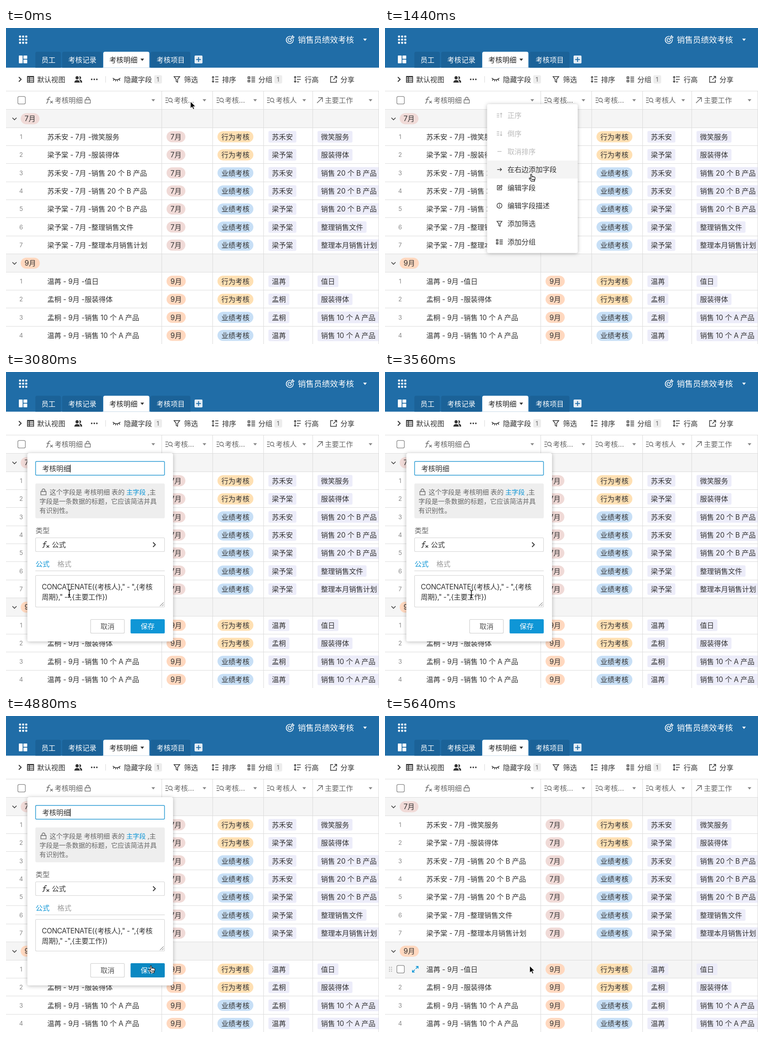
These frames come from a looping animation (813 by 689 pixels, 5.68 s). An HTML page:

```html
<!DOCTYPE html>
<html lang="zh-CN">
<head>
<meta charset="utf-8">
<style>
html, body { margin: 0; width: 100%; height: 100%; overflow: hidden; background: #fff; }
svg { display: block; }
text { font-family: Inter, "Noto Sans CJK SC", "Noto Sans CJK", sans-serif; white-space: pre; word-spacing: -.3px; }
.float { filter: drop-shadow(0 1px 4px rgba(0, 0, 0, .28)); }
</style>
</head>
<body>
<svg id="stage" width="813" height="689" viewBox="0 0 813 689"></svg>
<script>
const LOOP = 5680, MENU_AT = 760, PANEL_AT = 1870, SAVE_AT = 5160;
const PITCH = 39.37, SIZE = 15.3, HOVER_ROW = 9;
const INK = '#333', GRAY = '#666', LINE = '#dcdcdc', BLUE = '#0f96d6';

const pen = document.createElement('canvas').getContext('2d');
pen.font = `${SIZE}px Inter, "Noto Sans CJK SC", "Noto Sans CJK", sans-serif`;

// Shape helpers; text and icons are placed by their vertical centre.
const text = (x, y, s, fill = INK, size = SIZE, more = '') =>
  `<text x="${x}" y="${y + size * .37}" fill="${fill}" font-size="${size}" ${more}>${s}</text>`;
const rect = (x, y, w, h, fill, r = 0, more = '') =>
  `<rect x="${x}" y="${y}" width="${w}" height="${h}" rx="${r}" fill="${fill}" ${more}/>`;
const box = (x, y, w, h, stroke, r = 2, width = 1.1) =>
  rect(x, y, w, h, '#fff', r, `stroke="${stroke}" stroke-width="${width}"`);
const icon = (name, x, y, color = INK, width = 1.5) =>
  `<path d="${ICONS[name]}" transform="translate(${x} ${y})" fill="none" stroke="${color}" stroke-width="${width}"/>`;
const solid = (name, x, y, color = INK) =>
  `<path d="${ICONS[name]}" transform="translate(${x} ${y})" fill="${color}"/>`;
const label = (x, y, s, fill, h, r, pad) =>
  rect(x, y - h / 2, pen.measureText(s).width + 2 * pad, h, fill, r) + text(x + pad, y, s);
const pill = (x, y, s, fill) => label(x, y, s, fill, 24.2, 12.1, 8.5);
const chip = (x, y, s) => label(x, y, s, '#ececf9', 25.2, 3, 7.5);
const group = (id, body) => `<g id="${id}">${body}</g>`;
const rowY = k => 197.8 + PITCH * k;

const ICONS = {
  caret: 'M-4-2.3h8l-4 5z',
  right: 'M-2.5-5l5 5-5 5',
  down: 'M-4.5-2l4.5 4.5 4.5-4.5',
  fx: 'M2-6.3c-3.3-1.5-4.5.5-5 3.3l-1.2 6.5c-.5 2.5-1.5 3.3-3.3 2.5M-6.5-2h7M1.5 1.5l5.5 5M7 1.5l-5.5 5',
  lock: 'M-5.7-1h11.4v7.3h-11.4zM-3.2-1v-2.3a3.2 3.2 0 0 1 6.4 0V-1',
  lookup: 'M-8-5h6M-8 0h4.5M-8 5h6M-1.3-.5a4 4 0 1 0 8 0a4 4 0 1 0-8 0M5.3 2.8l2.4 3.2',
  link: 'M-6 6L5.5-5.5M-3.5-5.7h9.2v9.2',
  filter: 'M-6.2-6h12.4l-4.6 6v6.2l-3.2-1.6v-4.6z',
  sort: 'M0-5.5h7M0 0h7M0 5.5h7M-4.7-6v12M-7-4l2.3-2.3L-2.4-4M-7 4l2.3 2.3L-2.4 4',
  group: 'M-7.5-5.5h4v3.7h-4zM-7.5 1.8h4v3.7h-4zM0-5h8M0-1.5h8M0 2h8M0 5.5h8',
  height: 'M-1-5.5h8.5M-1 0h8.5M-1 5.5h5M-4.8-6v12M-7-4l2.2-2.3L-2.6-4M-7 4l2.2 2.3L-2.6 4',
  share: 'M-1-6h-5.5v12.5h12.5v-5.5M2-6.5h4.7v4.7M6.5-6.3l-7 7',
  table: 'M-6.8-6.5h13.6v13h-13.6zM-6.8-5h13.6M-6.8-1h13.6M-6.8 3h13.6M-2.5-6v12',
  eye: 'M-8-3c3.2 5 12.8 5 16 0M-5.5 0l-1.7 2.8M-1.8 1.2l-.5 3.2M1.8 1.2l.5 3.2M5.5 0l1.7 2.8',
  people: 'M-6-3.5a3.5 3.5 0 1 1 7 0a3.5 3.5 0 1 1-7 0M-8.5 7c0-7.5 12-7.5 12 0zM2.3-6.8a3.3 3.3 0 1 1 0 6.5q1.5-3.2 0-6.5M4.8 7q0-4-2.6-6c4-.8 6.3 2 6.3 6z',
  goal: 'M2.2-7.4a7.7 7.7 0 1 0 5.3 5.3M1-3.6a3.8 3.8 0 1 0 2.7 2.7M0 0l4.2-4.2v-3l2-2 .8 2.3 2.3.8-2 2h-3',
  asc: 'M-6.5-4h6M-6.5 0h6M-6.5 4h6M4-5.5v11M1.7-3.2L4-5.5l2.3 2.3',
  desc: 'M-6.5-4h6M-6.5 0h6M-6.5 4h6M4-5.5v11M1.7 3.2L4 5.5l2.3-2.3',
  minus: 'M-5 0h10',
  go: 'M-5.5 0h10M1.5-3.5L5 0l-3.5 3.5',
  edit: 'M1-5h-6.2v10.4h10.4v-6M-2 2.2l.5-2.6 6-5.6 2 2-6 5.7z',
  info: 'M-6 0a6 6 0 1 0 12 0a6 6 0 1 0-12 0M0-.8v4M0-3.4v1.5',
  expand: 'M1-1l5-5M1.5-6h4.7v4.7M-1 1l-5 5M-6.2 1.5v4.7h4.7'
};

function topBar() {
  let s = rect(0, 0, 813, 86.5, '#206da7');
  for (let i = 0; i < 9; i++)
    s += rect(28.4 + i % 3 * 6.8, 16.4 + (i / 3 | 0) * 6.8, 4.4, 4.4, '#fff', 1.4);
  s += icon('goal', 618.5, 26, '#fff', 1.6) +
    text(636, 25.5, '销售员绩效考核', '#fff', 17.5, 'font-weight="500"') + solid('caret', 782.5, 25.5, '#fff');
  s += rect(28, 60, 8.3, 17, '#fff', 1) + rect(38, 60, 8.3, 7.3, '#fff', 1) + rect(38, 69, 8.3, 8, '#fff', 1);
  [[64, 55.5, '员工'], [122.5, 87.5, '考核记录'], [212, 100.5, '考核明细'], [315, 87, '考核项目']].forEach(([x, w, name], i) => {
    const on = i == 2;
    s += `<path d="M${x} 86.5V55.7q0-4 4-4h${w - 8}q4 0 4 4v30.8z" fill="${on ? '#fff' : '#1b6298'}"/>` +
      text(x + 13.3, 69, name, on ? '#222' : '#fff');
  });
  return s + solid('caret', 297, 69) + rect(411, 60, 17.3, 17.3, '#e3edf5', 2) +
    '<path d="M414.5 68.7h10.4M419.7 63.5v10.4" stroke="#206da7" stroke-width="2"/>';
}

function toolBar() {
  const y = 112, badge = x => rect(x, 103, 17, 18, '#ededed', 3) + text(x + 5.3, y, '1', GRAY, 13);
  let s = icon('right', 30.5, y, INK, 2) + icon('table', 53.5, y, INK, 1.6) + text(68, y, '默认视图') +
    solid('people', 157.5, y) + rect(216.5, 105, 1, 14, '#d8d8d8');
  for (let i = 0; i < 3; i++) s += `<circle cx="${186.8 + i * 5.6}" cy="112" r="1.7" fill="${INK}"/>`;
  [['eye', 241, 257, '隐藏字段'], ['filter', 372.5, 388, '筛选'], ['sort', 456, 471, '排序'],
   ['group', 535, 550, '分组'], ['height', 635, 651, '行高'], ['share', 714, 729, '分享']]
    .forEach(([name, ix, tx, title]) => s += icon(name, ix, y) + text(tx, y, title));
  return s + badge(323) + badge(585);
}

const checkbox = y => box(25.8, y - 8.2, 16.4, 16.4, '#858585', 3, 1.3);

function records() {
  const A = '苏禾安', B = '梁予棠', C = '温苒', D = '孟桐';
  const twenty = '销售 20 个 B 产品', ten = '销售 10 个 A 产品';
  const months = [
    ['7月', '#f0dad7', [[A, '微笑服务'], [B, '服装得体'], [A, twenty], [A, twenty], [B, twenty], [B, '整理销售文件'], [B, '整理本月销售计划']]],
    ['9月', '#ffd8bf', [[C, '值日'], [D, '服装得体'], [D, ten], [C, ten]]]
  ];
  let back = '', front = '', k = 0;
  for (const [month, color, list] of months) {
    const y = rowY(k++);
    back += rect(0, y - PITCH / 2, 813, PITCH, '#f5f5f5');
    front += icon('down', 18.5, y) + pill(32, y, month, color);
    list.forEach(([who, job], i) => {
      const y = rowY(k), rated = i > 1;
      front += text(33, y, i + 1, '#888', 13, `text-anchor="middle" ${k == HOVER_ROW ? 'id="number"' : ''}`) +
        text(90, y, `${who} - ${month} -${job}`) + pill(350, y, month, color) +
        pill(461, y, rated ? '业绩考核' : '行为考核', rated ? '#c7dff6' : '#ffe0b3') +
        chip(572, y, who) + chip(679, y, job);
      k++;
    });
  }
  const y = rowY(HOVER_ROW);
  back += group('rowBack', rect(0, y - PITCH / 2, 813, PITCH, '#f5f5f5'));
  let d = '';
  for (let i = 0; i < 13; i++) d += `M0 ${Math.round(178.2 + PITCH * i) - .5}h813`;
  for (const x of [339.5, 450.5, 561.5, 668.5, 812.5]) d += `M${x} 137v552`;
  back += `<path d="M0 137.5h813${d}" stroke="${LINE}" stroke-width="1.1"/>`;
  let tools = checkbox(y) + icon('expand', 66, y, BLUE, 1.6);
  for (let i = 0; i < 6; i++) tools += rect(8.8 + i % 2 * 4.4, y - 5.2 + (i >> 1) * 4.2, 2, 2, '#aaa');
  return back + `<g clip-path="url(#edge)">${front}</g>` + group('rowTools', tools);
}

function tableHead() {
  const y = 157.5;
  let s = checkbox(y) + icon('lock', 178, y, GRAY, 1.3);
  [['fx', 95, 106, '考核明细', 321], ['lookup', 355.5, 366, '考核...', 432.5], ['lookup', 467, 477, '考核...', 543],
   ['lookup', 577, 588, '考核人', 650], ['link', 684, 695, '主要工作', 794.5]]
    .forEach(([name, ix, tx, title, cx]) =>
      s += icon(name, ix, y, GRAY, 1.4) + text(tx, y, title, GRAY) + solid('caret', cx, y, '#888'));
  return s;
}

function menu() {
  let s = rect(222.5, 166, 197.5, 324.5, '#fff', 4, 'class="float"') +
    rect(222.5, 0, 197.5, PITCH, '#f4f4f4', 0, 'id="menuHover"');
  [['asc', '正序'], ['desc', '倒序'], ['minus', '取消排序'], ['go', '在右边添加字段'], ['edit', '编辑字段'],
   ['info', '编辑字段描述'], ['filter', '添加筛选'], ['group', '添加分组']].forEach(([name, title], i) => {
    const y = 190.5 + PITCH * i, color = i < 3 ? '#bbb' : INK;
    s += `<g transform="translate(249.5 ${y}) scale(.9)">${icon(name, 0, 0, color, 1.5)}</g>` + text(267, y, title, color);
  });
  return s;
}

function panel() {
  const edge = '#d3d3d3', note = (x, y, s) => text(x, y, s, GRAY, 14.2), tight = 'letter-spacing="-.35"';
  return rect(46.5, 177, 317.5, 410.5, '#fff', 4, 'class="float"') +
    box(64.5, 195, 281, 30, '#2b9bd3', 2, 1.5) + text(79, 210, '考核明细') +
    rect(139.6, 202, 1.2, 17, '#111', 0, 'id="caret"') +
    rect(64, 243, 282, 76, '#eee', 3) + icon('lock', 81.7, 261.5, GRAY, 1.3) +
    note(95, 262, `这个字段是 考核明细 表的 <tspan fill="${BLUE}">主字段</tspan> ,主`) +
    note(73, 282, '字段是一条数据的标题，它应该简洁并具') + note(73, 301.5, '有识别性。') +
    text(64.5, 345.5, '类型', GRAY) + box(64.5, 361.5, 281, 30, edge) +
    icon('fx', 87, 376.5, INK, 1.5) + text(100, 376.5, '公式') + icon('right', 323, 376.5, INK, 1.8) +
    text(64.5, 418, '公式', BLUE, SIZE, 'font-weight="500"') + text(112, 418, '格式', '#999') +
    rect(64, 433, 282, 1.1, edge) + box(64.5, 443.5, 281, 69, edge) +
    text(78, 468, 'CONCATENATE({考核人}," - ",{考核', INK, SIZE, tight) +
    text(78, 490, '周期}," -",{主要工作})', INK, SIZE, tight) +
    '<path d="M335.5 510.5l8-8M340 510.5l3.5-3.5" stroke="#555"/>' +
    box(184.5, 539.5, 73.5, 30, '#ccc') + text(206, 554.5, '取消', '#555') +
    rect(271.5, 539, 74.5, 31, BLUE, 2, 'id="save"') + text(293.5, 554.5, '保存', '#fff', SIZE, 'font-weight="500"');
}

const pointers =
  group('arrow', '<path d="M0 0v15.8l3.6-3.4 2.4 5.4 2.6-1.1-2.3-5.3h4.9z" stroke="#fff" stroke-width="1.1"/>') +
  group('hand', '<path transform="translate(-4.4 -1)" d="M3.6 1.9c.3-1.6 2.4-1.3 2.6.2l.6 4.3c.4-1 2-.9 2.3.1.6-.7 2-.5 2.3.6.7-.6 2.1-.2 2.2 1.2.2 3-.4 4.4-1.2 6l-.3 2.2H5.3c-.6-2-2.5-3.6-4.4-5.9-.9-1.3.7-2.3 1.8-1.4l2 1.6zM7 11v3.2M9.2 11v3.2M11.2 11v3.2" fill="#fff" stroke="#111" stroke-width="1.2"/>') +
  group('beam', '<path d="M-3.5-8.5Q0-8.5 0-6V6Q0 8.5-3.5 8.5M3.5-8.5Q0-8.5 0-6M3.5 8.5Q0 8.5 0 6M-2 3h4" fill="none" stroke="#111" stroke-width="1.4"/>');

const stage = document.getElementById('stage');
stage.innerHTML = '<clipPath id="edge"><path d="M0 0h812v689H0z"/></clipPath>' +
  rect(0, 0, 813, 689, '#fff') + topBar() + toolBar() + records() + tableHead() +
  group('menu', menu()) + group('panel', panel()) + group('pointer', pointers);

const el = {};
stage.querySelectorAll('[id]').forEach(node => el[node.id] = node);
const show = (id, on) => el[id].style.display = on ? '' : 'none';

// Pointer stops: time, x, y.
const STOPS = [[0, 402, 159.8], [80, 402, 159.8], [520, 321, 158], [960, 321, 158], [1420, 318, 319], [1460, 318, 319],
  [1700, 317, 348], [2120, 317, 348], [2900, 138, 483], [3200, 138, 483], [4120, 285.5, 487],
  [4280, 285.5, 487], [4720, 315.3, 544.5], [LOOP, 315.3, 544.5]];

function pointerAt(t) {
  const i = STOPS.findIndex(stop => stop[0] > t);
  const [t0, x0, y0] = STOPS[i - 1], [t1, x1, y1] = STOPS[i];
  const u = (t - t0) / (t1 - t0), e = u * u * (3 - 2 * u);
  return [x0 + (x1 - x0) * e, y0 + (y1 - y0) * e];
}

function pointerKind(t, x, y, editing) {
  if (t < PANEL_AT) return t < 430 ? 'arrow' : 'hand';
  if (!editing) return 'arrow';
  if (y > 443 && y < 513) return 'beam';
  return y < 392 || (y > 539 && x > 271) ? 'hand' : 'arrow';
}

function draw() {
  const t = performance.now() % LOOP, [x, y] = pointerAt(t);
  const editing = t >= PANEL_AT && t < SAVE_AT, done = t >= SAVE_AT;
  const kind = pointerKind(t, x, y, editing);
  const item = Math.floor((y - 170.8) / PITCH);
  show('menu', t >= MENU_AT && t < PANEL_AT);
  show('menuHover', item > 2);
  el.menuHover.setAttribute('y', 170.8 + PITCH * item);
  show('panel', editing);
  show('caret', (t - PANEL_AT) % 1000 < 500);
  el.save.setAttribute('fill', kind == 'hand' && y > 539 ? '#0a88c2' : BLUE);
  show('rowBack', done);
  show('rowTools', done);
  show('number', !done);
  for (const name of ['arrow', 'hand', 'beam']) show(name, name == kind);
  el.pointer.setAttribute('transform', `translate(${x} ${y})`);
  requestAnimationFrame(draw);
}
draw();
</script>
</body>
</html>
```
